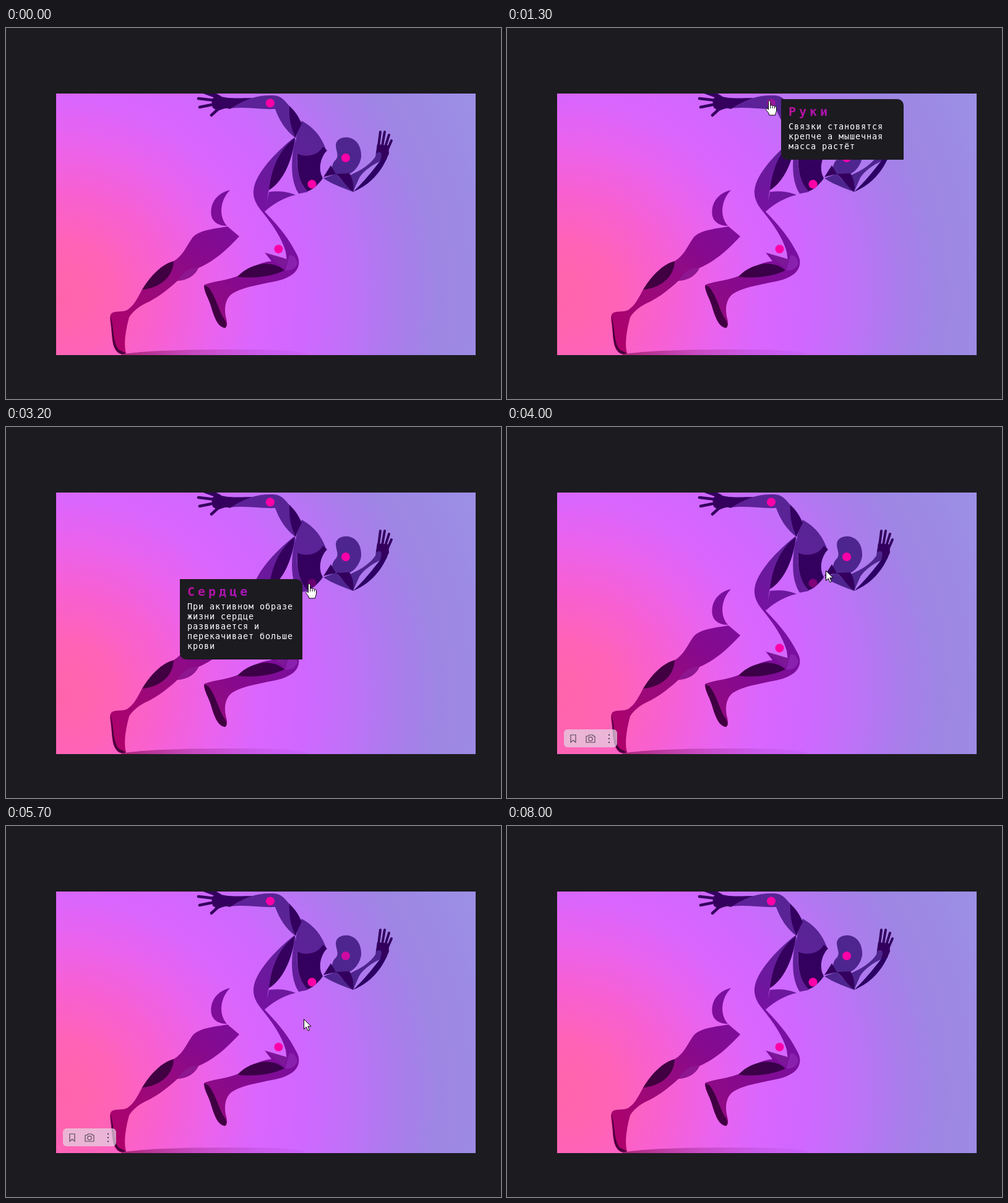
Write an HTML page that moves like this. It is 800x600 px and loops after 8200 ms.

```html
<!DOCTYPE html>
<html lang="ru">
<head>
<meta charset="utf-8">
<title>Польза бега</title>
<style>
  html, body { margin: 0; width: 100%; height: 100%; overflow: hidden; background: #1c1b20; }
  #stage { position: relative; width: 800px; height: 600px; overflow: hidden; }
  #stage > svg { position: absolute; left: 0; top: 0; overflow: visible; }
  .tip {
    position: absolute; width: 198px; box-sizing: border-box; padding: 8px 0 13.6px 12px;
    border-radius: 0 10px 0 10px; background: #1c1b20; color: #fff;
    font: 13.5px/16.1px "DejaVu Sans Mono", monospace; letter-spacing: .87px; white-space: pre;
    visibility: hidden;
  }
  .tip b {
    display: block; width: 130px; height: 24px; margin-bottom: 4px;
    font-size: 20px; line-height: 24px; letter-spacing: 5px; color: transparent;
    background: linear-gradient(90deg, #b8129c, #a018c6); -webkit-background-clip: text; background-clip: text;
  }
  #cursor { will-change: transform; }
</style>
</head>
<body>
<div id="stage">
  <svg width="800" height="600" viewBox="0 0 800 600">
    <defs>
      <radialGradient id="sky" gradientUnits="userSpaceOnUse" cx="85" cy="437" r="750">
        <stop offset="0" stop-color="#ff65aa"/>
        <stop offset=".12" stop-color="#ff63b6"/>
        <stop offset=".23" stop-color="#f860d2"/>
        <stop offset=".34" stop-color="#e963ee"/>
        <stop offset=".44" stop-color="#d966ff"/>
        <stop offset=".53" stop-color="#d067ff"/>
        <stop offset=".62" stop-color="#c170f9"/>
        <stop offset=".72" stop-color="#ac7bed"/>
        <stop offset=".82" stop-color="#9d86e3"/>
        <stop offset="1" stop-color="#9c90e6"/>
      </radialGradient>
      <linearGradient id="skin" gradientUnits="userSpaceOnUse" x1="180" y1="520" x2="500" y2="150">
        <stop offset="0" stop-color="#b0006a"/>
        <stop offset=".25" stop-color="#980a7c"/>
        <stop offset=".45" stop-color="#840a90"/>
        <stop offset=".65" stop-color="#7810a2"/>
        <stop offset=".85" stop-color="#602099"/>
        <stop offset="1" stop-color="#562594"/>
      </linearGradient>
      <linearGradient id="shade" gradientUnits="userSpaceOnUse" x1="180" y1="520" x2="470" y2="200">
        <stop offset="0" stop-color="#48003c"/>
        <stop offset=".5" stop-color="#3c0044"/>
        <stop offset="1" stop-color="#340060"/>
      </linearGradient>
      <linearGradient id="ground" gradientUnits="userSpaceOnUse" x1="185" y1="0" x2="490" y2="0">
        <stop offset="0" stop-color="#a0206f" stop-opacity=".9"/>
        <stop offset=".4" stop-color="#b03aa8" stop-opacity=".6"/>
        <stop offset="1" stop-color="#b050e0" stop-opacity=".15"/>
      </linearGradient>
      <clipPath id="frame"><path d="M81 106H759V529H81Z"/></clipPath>
    </defs>

    <g clip-path="url(#frame)">
      <path d="M81 106H759V529H81Z" fill="url(#sky)"/>
      <path d="M186 528C230 521 300 520 370 520S470 522 488 527L480 529H186Z" fill="url(#ground)"/>

      <g fill="url(#skin)">
        <!-- back leg -->
        <path d="M358 321C335 325 309 327 300 341C290 356 285 369 271 377C250 383 233 402 220 423C213 436 207 449 196 456C188 460 178 457 171 461C167 465 168 471 169 478C172 495 170 512 178 522C182 528 189 529 194 526C190 512 193 490 199 468C203 461 212 452 224 446C244 437 262 423 277 409C290 408 304 403 311 388C340 376 362 353 377 337Z"/>
        <path d="M362 262C338 268 329 286 332 304C335 316 346 320 357 320C344 305 345 280 362 262Z"/>
        <!-- spine, thigh and knee -->
        <path d="M466 177C440 197 402 235 400 263C399 276 405 286 413 296C431 318 446 340 452 362L454 377L438 371L418 363L429 377C410 379 394 388 375 401C358 408 338 409 321 415C318 424 326 433 331 449C336 466 342 484 354 485C359 482 357 474 355 466C352 450 356 437 365 430C385 417 425 413 446 407C460 402 471 395 473 383C475 372 469 365 465 357C452 333 436 316 418 297C423 284 422 272 425 262C445 250 462 220 467 178Z"/>
        <path d="M418 297C431 285 449 274 468 270C452 263 436 264 425 265Z"/>
        <!-- torso -->
        <path d="M468 178C459 215 460 248 473 268L488 265C474 250 468 225 471 203Z"/>
        <path d="M478 150C495 160 508 172 517 196C505 207 485 210 471 203C466 190 468 170 478 150Z"/>
        <!-- raised arm -->
        <path d="M362 130C383 115 408 108 432 109C447 110 451 119 459 127C460 145 462 160 468 178C452 166 442 150 435 131C410 132 386 127 362 130Z"/>
      </g>
      <g fill="#4e258e">
        <path d="M533 189C534 180 543 176 553 177C566 179 575 191 574 209C572 222 563 232 555 236L528 238C525 226 528 217 533 213C539 206 533 199 533 189Z"/>
        <path d="M513 243L533 236L561 265C545 259 526 252 513 243Z"/>
        <path d="M556 238C575 230 590 219 597 208L600 188L612 193L606 215C592 221 578 231 571 242L561 265Z"/>
      </g>
      <path d="M421 364L450 389L455 374Z" fill="#7c1898"/>
      <path d="M278 408C286 392 302 386 311 388C304 402 291 408 278 408Z" fill="#8e1690"/>
      <path d="M458 368C464 366 470 372 471 381C467 390 460 393 451 392Z" fill="#8a20ae"/>

      <g fill="url(#shade)">
        <path d="M271 377C250 383 233 402 220 423C246 421 270 405 271 377Z"/>
        <path d="M169 465C175 485 172 507 182 520L194 526C186 530 178 525 174 513C170 496 171 481 169 465Z"/>
        <path d="M374 402C394 381 429 373 450 392C430 402 399 406 374 402Z"/>
        <path d="M320 416C321 429 327 436 331 449C336 466 342 484 354 485C358 482 357 476 351 468C343 454 338 432 327 419Z"/>
        <path d="M467 178C450 190 430 215 425 262C445 250 462 220 467 178Z"/>
        <path d="M471 203C485 210 505 206 512 192L519 198C511 206 505 221 509 236L512 243C506 252 496 262 487 264C474 250 469 228 471 203Z"/>
        <path d="M458 126C467 134 474 145 478 155C474 163 470 170 468 178C460 160 457 145 458 126Z"/>
        <path d="M398 113C384 118 374 123 362 131C353 128 349 132 342 134L334 129L332 116L340 108C350 114 370 114 398 113Z"/>
      </g>
      <g fill="#34005e">
        <path d="M513 241L525 222L533 236Z"/>
        <path d="M533 236L555 235C560 243 563 255 561 265C550 257 543 244 533 236Z"/>
        <path d="M561 265C578 249 594 229 607 212L616 210C605 234 589 253 561 265Z" fill="#2c0064"/>
        <path d="M600 188L618 190L619 203L614 214L605 213C609 204 606 197 598 203Z"/>
      </g>
      <g fill="none" stroke="#34005e" stroke-width="4.5" stroke-linecap="round">
        <path d="M341 112L317 103M346 112L330 103M337 117L311 114M338 123L313 128M344 130L332 141"/>
        <path d="M602 191L605 168M608 191L612 168M613 192L619 173M616 198L623 182" stroke-width="4"/>
      </g>
      <g id="dots" fill="#ff00a8">
        <circle cx="427" cy="121.5" r="7"/>
        <circle cx="494.5" cy="252.5" r="7"/>
        <circle cx="549" cy="210" r="7"/>
        <circle cx="440.5" cy="357.5" r="7"/>
      </g>
    </g>

    <g id="bar" fill="none" stroke="#5b4a5b" stroke-width="1.2">
      <rect x="92" y="489" width="86" height="29" rx="6" fill="#e4d6e4" fill-opacity=".72" stroke="none"/>
      <path d="M103 498H111V510L107 506.500L103 510Z"/>
      <path d="M128 500H131L133 498H138L140 500H142V510H128Z" stroke-linejoin="round"/>
      <circle cx="135" cy="504.500" r="3.2"/>
      <path d="M165 498V511" stroke-width="2.4" stroke-linecap="round" stroke-dasharray="0 6"/>
    </g>
  </svg>

  <div class="tip" style="left:443px;top:115px"><b>Руки</b>Связки становятся
крепче а мышечная
масса растёт</div>
  <div class="tip" style="left:281px;top:246px"><b>Сердце</b>При активном образе
жизни сердце
развивается и
перекачивает больше
крови</div>
  <div class="tip" style="left:565px;top:203px"><b>Голова</b>Улучшается
кровообращение в
мозгу и реакция
человека</div>
  <div class="tip" style="left:456px;top:351px"><b>Ноги</b>Связки становятся
крепче а мышечная
масса растёт</div>

  <svg id="cursor" width="20" height="26" fill="#fff" stroke="#000" stroke-linejoin="round">
    <path id="arrow" d="M.5 .5V16.500L4.200 13L7 19L9.500 18L6.800 12H12Z"/>
    <g id="hand">
      <path d="M-1.500 1.500C-1.500 -.8 1.800 -.8 1.800 1.500V7.500C3 6.300 5 6.700 5.200 8C6.500 7.200 8.300 7.700 8.500 9C10 8.400 11.500 9.300 11.500 11V15C11.500 18 10 19 9.500 23H0C-.5 20 -3 17.500 -5 14.500C-6 12.500 -3.800 11.200 -2.400 12.700L-1.500 14Z"/>
      <path d="M1.800 7.500V12M5.200 8.500V12M8.500 9.500V12" fill="none"/>
    </g>
  </svg>
</div>

<script>
const LOOP = 8200, STEP = 100, FADE = 500;
const $ = id => document.getElementById(id);
const tips = [...document.querySelectorAll('.tip')];
const dots = [...$('dots').children];

// [from, to] hover times, in the order of the tips
const hovers = [[1000, 1900], [2700, 3800], [4200, 5300], [5900, 7000]];

// [start, end, x, y]: the pointer glides to x, y between start and end
const entry = [120, 28];
const moves = [
  [100, 1000, 424, 118],
  [1800, 2400, 470, 234],
  [2500, 2700, 490, 254],
  [3700, 4000, 515, 232],
  [4100, 4200, 548, 213],
  [5200, 5500, 500, 290],
  [5600, 5900, 442, 355],
  [6900, 7100, 415, 325],
  [7200, 7600, 80, 0],
  [7800, 8000, 79, -18]
];

const clamp = v => Math.max(0, Math.min(1, v));
const show = (el, on) => { el.style.visibility = on ? 'visible' : 'hidden'; };

function pointerAt(t) {
  let [x, y] = entry;
  for (const [start, end, toX, toY] of moves) {
    const p = clamp((t - start) / (end - start));
    x += (toX - x) * p;
    y += (toY - y) * p;
  }
  return [x, y];
}

function draw(t) {
  const [x, y] = pointerAt(t);
  let over = false;
  hovers.forEach(([from, to], i) => {
    const on = t >= from && t < to;
    const k = t < to ? clamp((t - from) / FADE) : 1 - clamp((t - to) / FADE);
    over = over || on;
    show(tips[i], on);
    dots[i].style.opacity = 1 - .75 * k * (2 - k);
  });
  const inside = t >= 100;
  $('cursor').style.transform = `translate(${Math.round(x)}px, ${Math.round(y)}px)`;
  show($('arrow'), inside && !over);
  show($('hand'), over);
  show($('bar'), !over && t >= 2000 && t < 7900 || y > 106 && !over && t >= 900 && t < 1000);
}

function tick() {
  const t = performance.now() % LOOP;
  draw(Math.floor(t / STEP) * STEP);
  requestAnimationFrame(tick);
}
tick();
</script>
</body>
</html>
```
